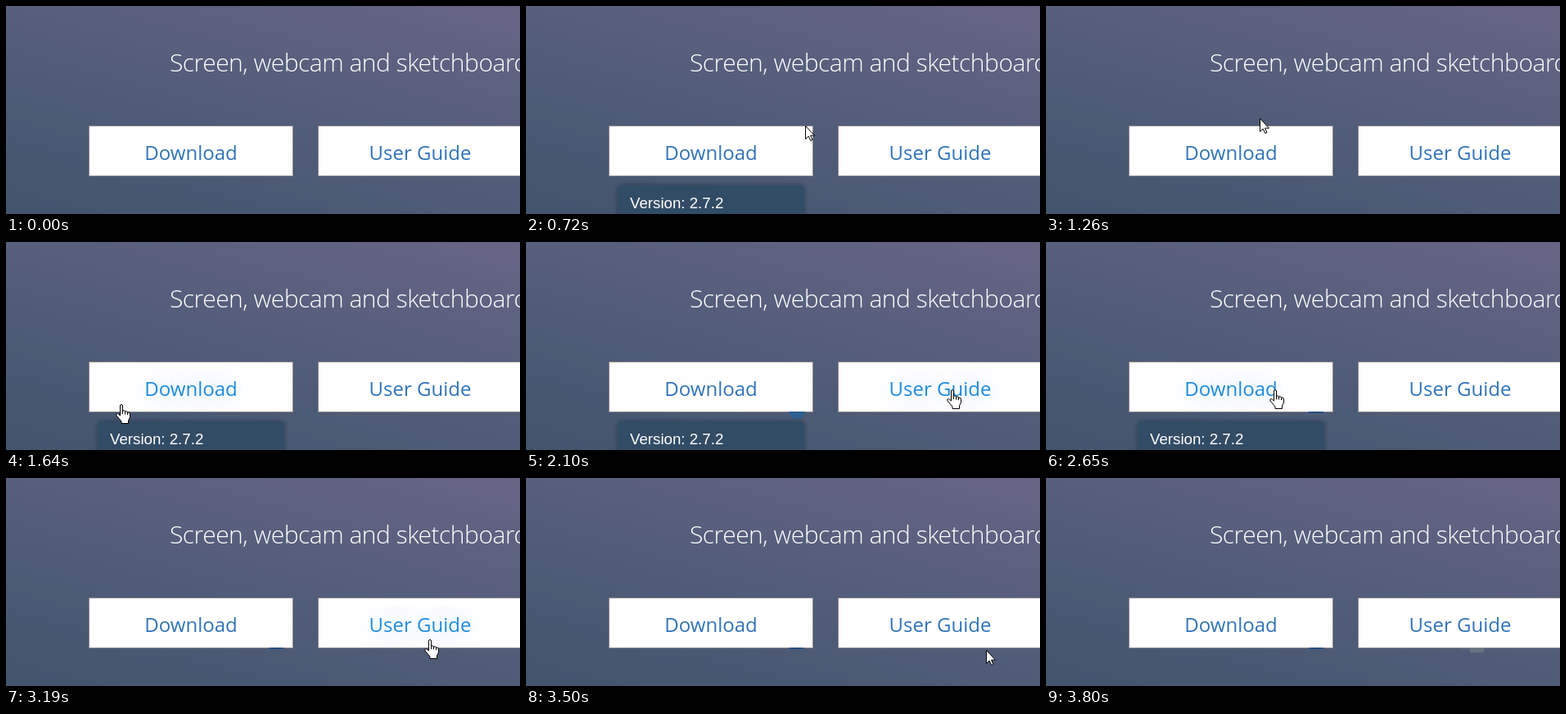
An HTML page with a canvas that plays this animation: 628 px wide and 254 px high, repeating every 4030 ms.

```html
<!DOCTYPE html>
<html lang="en">
<head>
<meta charset="utf-8">
<title>Download button hover</title>
<style>
  html, body { margin: 0; width: 100%; height: 100%; overflow: hidden; }
  canvas { display: block; }
</style>
</head>
<body>
<canvas id="stage" width="628" height="254"></canvas>
<script>
const ctx = document.getElementById('stage').getContext('2d');
const LOOP = 4030;

const buttons = [
  { label: 'Download', x: 102, y: 147, w: 248, h: 60 },
  { label: 'User Guide', x: 382, y: 147, w: 248, h: 60 },
];

// Pointer hotspot, held from each time until the next: [ms, x, y]
const pointerPath = [
  [720, 341, 146], [800, 331, 110], [880, 320, 74], [950, 309, 49],
  [1030, 298, 45], [1100, 287, 74], [1180, 275, 110], [1260, 261, 137],
  [1340, 215, 160], [1420, 150, 178], [1490, 91, 190], [1570, 140, 198],
  [1650, 225, 203], [1720, 286, 201], [1800, 286, 197], [1950, 335, 192],
  [2030, 440, 184], [2100, 520, 180], [2500, 440, 183], [2580, 345, 181],
  [2650, 279, 180], [2880, 405, 189], [2960, 517, 197], [3270, 525, 198],
  [3340, 536, 200], [3420, 550, 204], [3500, 562, 210], [3570, 561, 216],
  [3650, 555, 222], [3730, 520, 214],
];
const POINTER_END = 3800;
const tooltipSpans = [[720, 1030], [1340, 2330], [2580, 3190]];

const arrowShape = new Path2D(
  'M.5 .5V16.5L4.2 13L6.8 18.5L9 17.5L6.5 12.2H11.5Z');
const handShape = new Path2D(
  'M5.5 14V2Q5.5 .5 7 .5T8.5 2V8Q11 7 11.5 9Q14 8 14.5 10Q17.5 9.5 17.5 12' +
  'V16L15.5 20V23.5H7V21L1 14Q0 11.5 2.5 11.5Z');
const handCreases = new Path2D('M8.5 8V12M11.5 9V12.5M14.5 10V13');

const background = ctx.createLinearGradient(0, 254, 117, -176);
background.addColorStop(0, '#42556d');
background.addColorStop(0.5, '#545e7a');
background.addColorStop(1, '#6b6688');

function text(string, x, y, font, color, align = 'left') {
  ctx.font = font;
  ctx.fillStyle = color;
  ctx.textAlign = align;
  ctx.fillText(string, x, y);
}

function rect(x, y, w, h, color) {
  ctx.fillStyle = color;
  ctx.fillRect(x, y, w, h);
}

function contains(b, p) {
  return p[1] >= b.x && p[1] < b.x + b.w && p[2] >= b.y && p[2] < b.y + b.h;
}

function drawButton(b, hovered) {
  rect(b.x - 1, b.y - 1, b.w + 2, b.h + 2, '#8e8a8c');
  rect(b.x, b.y, b.w, b.h, '#fff');
  ctx.save();
  if (hovered) {
    ctx.shadowColor = '#c4ebff';
    ctx.shadowBlur = 20;
  }
  text(b.label, b.x + b.w / 2, 188, '24px "Open Sans", "Noto Sans", sans-serif',
    hovered ? '#208bdc' : '#3073b9', 'center');
  ctx.restore();
}

function drawTooltip() {
  ctx.save();
  ctx.shadowColor = 'rgba(35, 50, 68, .8)';
  ctx.shadowBlur = 6;
  ctx.fillStyle = '#334c65';
  ctx.beginPath();
  ctx.roundRect(112, 219, 228, 50, 5);
  ctx.fill();
  ctx.restore();
  text('Version: 2.7.2', 127, 247, '18.7px "Liberation Sans", Arial, sans-serif', '#fff');
}

// Traces the pointer leaves below the buttons
function drawTraces(t) {
  if (t >= 1950 && t < 2330) {
    ctx.fillStyle = '#2d608f';
    ctx.beginPath();
    ctx.moveTo(321, 207);
    ctx.lineTo(341, 207);
    ctx.quadraticCurveTo(339, 214, 335, 216);
    ctx.lineTo(327, 216);
    ctx.quadraticCurveTo(323, 214, 321, 207);
    ctx.fill();
  } else if (t >= 2330) {
    rect(321, 207, 18, 2, '#28527e');
  }
  if (t >= 3730) {
    rect(507, 208, 30, 2, '#56627a');
    rect(518, 208, 17, 5, '#667482');
  }
}

function drawPointer(p, isHand) {
  ctx.save();
  ctx.translate(p[1] - (isHand ? 6 : 0), p[2]);
  ctx.fillStyle = '#fff';
  ctx.strokeStyle = '#000';
  ctx.lineWidth = 1;
  ctx.lineJoin = 'round';
  const shape = isHand ? handShape : arrowShape;
  ctx.fill(shape);
  ctx.stroke(shape);
  if (isHand) ctx.stroke(handCreases);
  ctx.restore();
}

function draw(t) {
  const pointer = t < POINTER_END && pointerPath.findLast(p => p[0] <= t);
  const target = pointer && buttons.find(b => contains(b, pointer));

  rect(0, 0, 628, 254, background);
  ctx.letterSpacing = '-0.5px';
  text('Screen, webcam and sketchboard', 200, 80,
    '300 30px "Open Sans", "Noto Sans", sans-serif', '#fff');
  ctx.letterSpacing = '0px';

  for (const b of buttons) drawButton(b, b === target);
  drawTraces(t);
  if (tooltipSpans.some(([from, to]) => t >= from && t < to)) drawTooltip();
  if (pointer) drawPointer(pointer, Boolean(target));
}

const start = performance.now();
function tick() {
  draw((performance.now() - start) % LOOP);
  requestAnimationFrame(tick);
}
tick();
</script>
</body>
</html>
```
